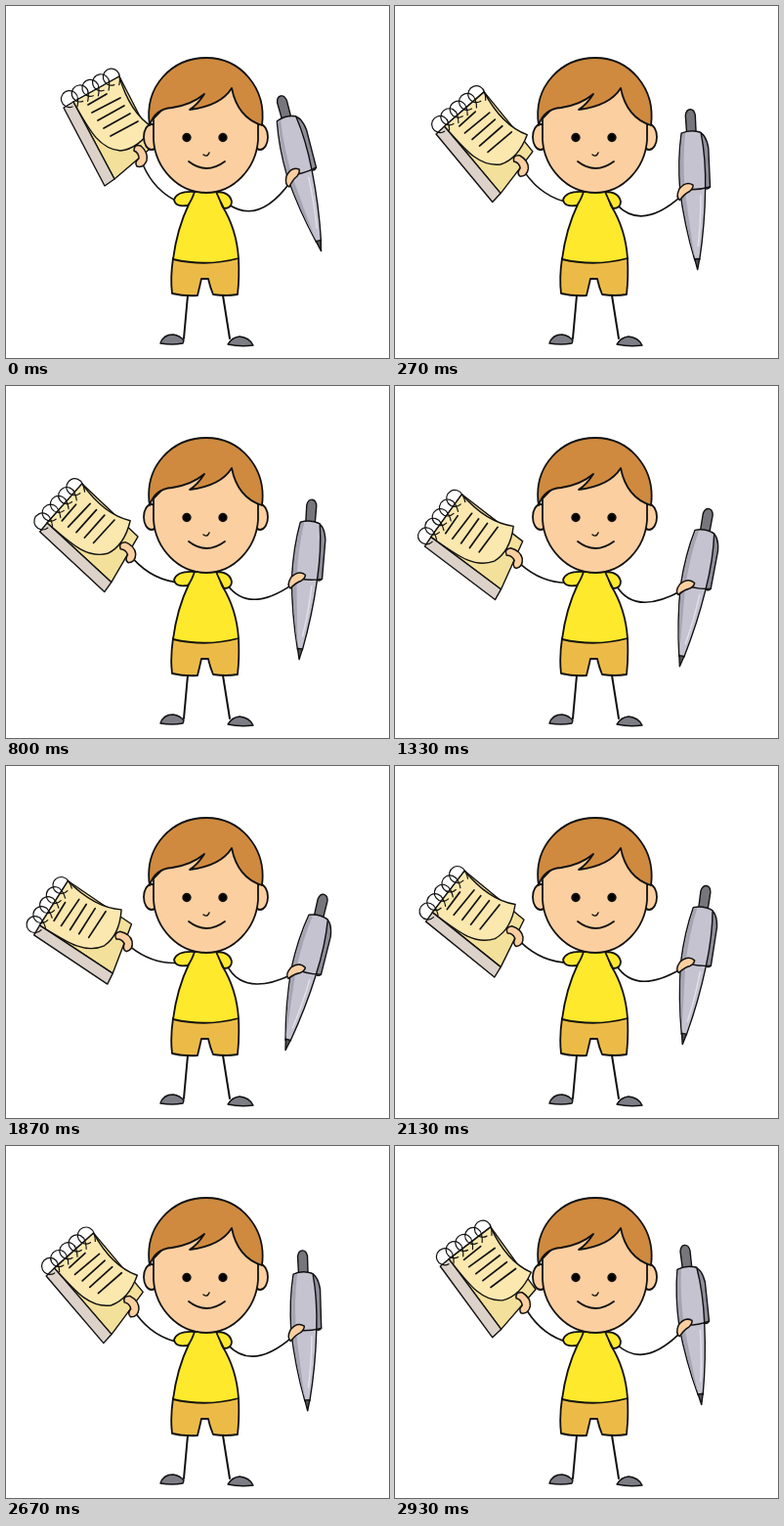
These frames come from a looping animation (392x360 px, 3470 ms). An HTML page:

```html
<!DOCTYPE html>
<html lang="en">
<head>
<meta charset="utf-8">
<title>Boy with notepad and pen</title>
<style>
  html, body { margin: 0; height: 100%; overflow: hidden; background: #fff; }
  svg { display: block; width: 100%; height: 100%; }
  .line { fill: none; }
  .skin { fill: #fbcfa0; }
  .hair { fill: #cf8a3f; }
  .shirt { fill: #ffe92d; }
  .shorts { fill: #ecbb47; }
  .shoe { fill: #7d7d86; }
  .thin { stroke-width: 1.4; }
</style>
</head>
<body>
<svg viewBox="0 0 392 360" stroke="#111" stroke-width="1.8" stroke-linecap="round" stroke-linejoin="round">
  <!-- Arm with notepad -->
  <g id="padArm">
    <path class="line" stroke-width="1.6" d="M140 162Q152 190 178 201"/>
    <g class="thin">
      <path fill="#f3e09a" d="M69 98L116 72L152 142L111 177Z"/>
      <path fill="#dcd2c9" d="M69 98L59 104L101 184L111 177Z"/>
      <path fill="#fae8af" d="M69 98L116 72C120 86 128 110 150 124Q136 146 117 148C94 146 84 124 69 98Z"/>
      <path class="line" stroke-width="1.7" d="M84 101L103 90M88 109L117 94M94 117L121 102M100 125L127 110M107 133L135 118"/>
      <g id="rings" class="line" stroke-width="1.2"></g>
    </g>
    <path class="skin" stroke-width="1.5" d="M131 148Q131 141 138 143Q146 150 144 158Q141 166 134 164Q131 160 136 156Q136 150 131 148Z"/>
  </g>

  <!-- Arm with pen -->
  <g id="penArm">
    <path class="line" stroke-width="1.6" d="M228 203Q259 224 291 180"/>
    <g class="thin" transform="translate(281 92) rotate(-14.5)">
      <path fill="#77767c" d="M-4.5 25L-5 6Q-4 0 0 0Q4 0 5 6L5 25Z"/>
      <path fill="#8f8e9b" d="M7 23Q15 25 17 40L17 80Q14 84 10 80Z"/>
      <path fill="#c5c3d0" d="M-10 24Q0 20 10 24Q14 50 12 82Q10 118 3 154L-2 154Q-11 118 -14 82Q-15 50 -10 24Z"/>
      <path fill="#a5a4b2" stroke="none" d="M-9 25Q-14 50 -13 82Q-10 118 -2 152Q-6 115 -9 82Q-10 50 -6 24Z"/>
      <path class="line" stroke="#e3e1e8" d="M7 88Q6 115 2 140"/>
      <path class="line" d="M-14 80Q0 84 17 80"/>
      <path fill="#55545b" d="M-2 153L3 153L0.5 164Z"/>
    </g>
    <path class="skin" stroke-width="1.5" d="M300 167Q292 164 287 174Q285 183 290 185Q293 178 298 174Q301 170 300 167Z"/>
  </g>

  <!-- Legs and clothes -->
  <path class="line" stroke-width="2" d="M186 296L182 340M222 296L229 340"/>
  <path class="shoe thin" d="M158 345Q161 336 171 336Q178 337 182 342L181 345Q170 347 158 345Z"/>
  <path class="shoe thin" d="M227 346Q231 339 239 338Q249 339 253 347Q240 349 227 346Z"/>
  <path class="shorts" d="M171 258Q168 278 170 294Q183 297 196 296Q198 288 200 279L207 279Q209 288 212 295Q225 297 237 295Q239 278 238 258Z"/>
  <path class="shirt" d="M192 190L187 203Q175 228 171 259Q205 267 238 258Q236 228 221 204L216 190Z"/>
  <path class="shirt" d="M193 190Q175 189 172 198Q173 206 186 204Q190 199 193 190Z"/>
  <path class="shirt" d="M215 190Q229 190 231 200Q231 207 223 207Q219 199 215 190Z"/>

  <!-- Head -->
  <ellipse class="skin" cx="149" cy="134" rx="8" ry="13"/>
  <ellipse class="skin" cx="260" cy="134" rx="8" ry="13"/>
  <path class="skin" d="M151 115V137C153 166 176 191 205 191C233 191 256 166 258 137V115L231 80L180 85Z"/>
  <path class="hair" d="M147 122C141 82 170 53 205 53C240 53 267 84 262 122C246 117 235 104 231 84Q220 102 188 106Q196 101 203 90Q190 101 170 104C158 105 151 110 147 122Z"/>
  <circle cx="185" cy="134.5" r="3.8"/>
  <circle cx="222" cy="134.5" r="3.8"/>
  <path class="line" d="M187 159Q205 173 224 159"/>
  <path class="line thin" d="M202 152Q206 155 208 150"/>
</svg>
<script>
  const LOOP = 3470;
  // [start in ms, arm swing in degrees]
  const poses = [
    [0, 0], [270, 12], [530, 16], [800, 19.3], [1070, 22.4], [1330, 25.2],
    [1600, 27.2], [1870, 28.6], [2130, 23.3], [2400, 17.9], [2670, 12.8], [2930, 8.6]
  ];
  const byId = id => document.getElementById(id);

  byId('rings').innerHTML = Array.from({ length: 5 }, (_, i) => {
    const x = 65 + i * 10.7, y = 95 - i * 5.6;
    return `<path d="M${x + 3} ${y + 8}A8.5 8.5 0 1 1 ${x + 8.5} ${y}Q${x + 9} ${y + 4} ${x + 8} ${y + 8}"/>`;
  }).join('');

  function draw(now) {
    const time = now % LOOP;
    const swing = poses.findLast(([start]) => start <= time)[1];
    byId('padArm').setAttribute('transform', `rotate(${-swing} 179 198)`);
    byId('penArm').setAttribute('transform', `rotate(${swing} 226 199)`);
  }

  const begin = performance.now();
  function tick() {
    draw(performance.now() - begin);
    requestAnimationFrame(tick);
  }
  tick();
</script>
</body>
</html>
```
